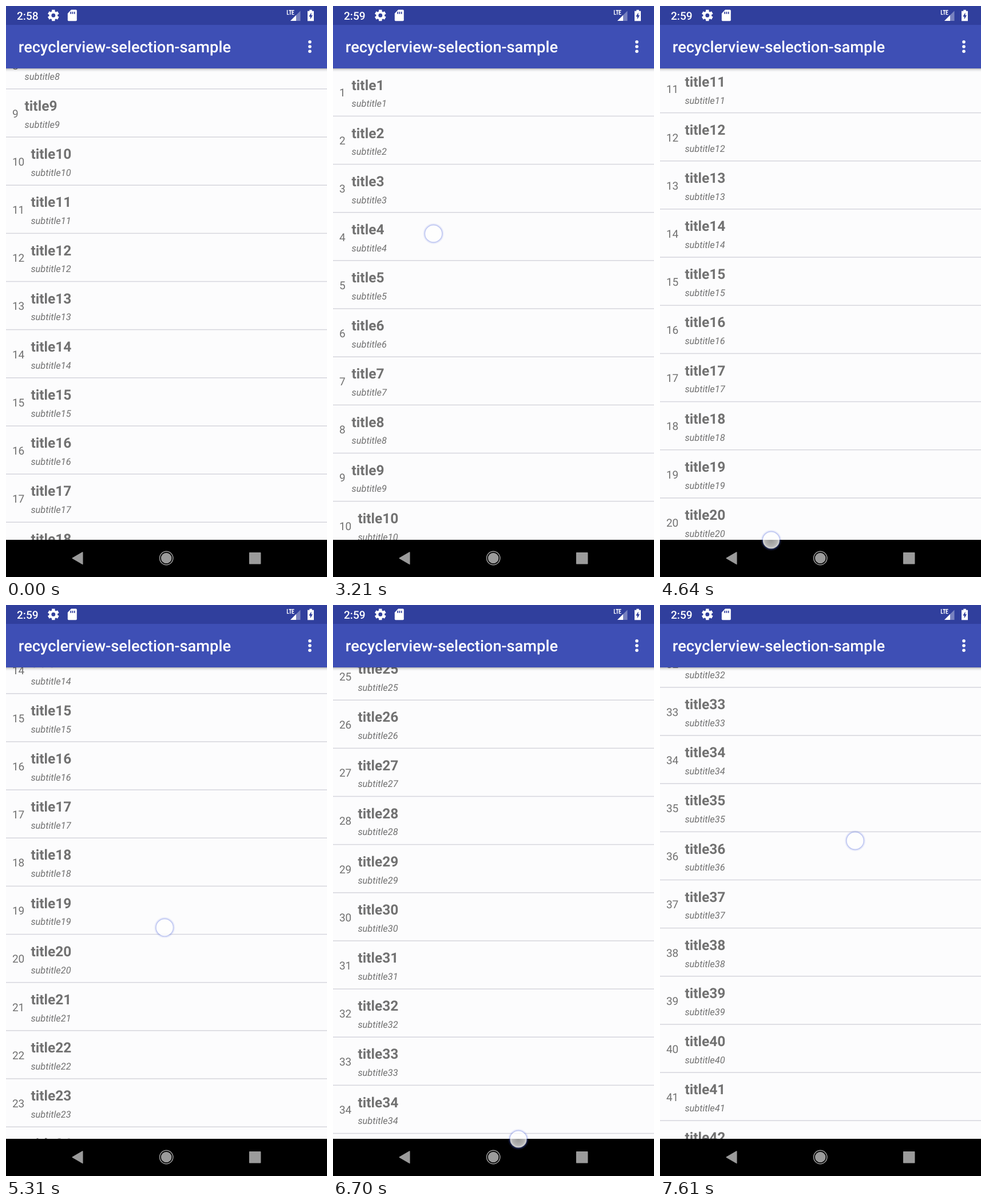
An HTML page for the animation above (8 s loop, 561x998 px).

```html
<!DOCTYPE html>
<html lang="en">
<head>
<meta charset="utf-8">
<title>Drag selection list</title>
<style>
  html, body { margin: 0; width: 100%; height: 100%; overflow: hidden; background: #fcfcfd; }
  svg { display: block; width: 561px; height: 998px; font-family: Roboto, sans-serif; }
  text { text-rendering: geometricPrecision; }
  .num { font-size: 19.09px; }
  .title { font-size: 24.5px; font-weight: 700; }
  .sub { font-size: 16.36px; font-style: italic; }
  #list text { fill: #717171; }
  .bar text { fill: #fff; font-weight: 500; }
</style>
</head>
<body>
<svg viewBox="0 0 561 998">
  <defs>
    <linearGradient id="shade" x2="0" y2="1">
      <stop offset="0" stop-color="#000" stop-opacity=".3"/>
      <stop offset=".4" stop-color="#000" stop-opacity=".1"/>
      <stop offset="1" stop-color="#000" stop-opacity="0"/>
    </linearGradient>
    <radialGradient id="spot">
      <stop offset="0" stop-color="#fff" stop-opacity=".6"/>
      <stop offset=".7" stop-color="#fff" stop-opacity=".7"/>
      <stop offset="1" stop-color="#fff" stop-opacity=".85"/>
    </radialGradient>
  </defs>

  <rect width="561" height="998" fill="#fcfcfd"/>
  <g id="list"></g>

  <rect y="109" width="561" height="6" fill="url(#shade)"/>
  <g class="bar">
    <rect width="561" height="109" fill="#3e4fb5"/>
    <rect width="561" height="33" fill="#303f9d"/>
    <text id="clock" x="19" y="23.8" font-size="19.09"></text>
    <text x="21.8" y="81.2" font-size="27.27">recyclerview-selection-sample</text>
    <g fill="#fff">
      <circle cx="531" cy="62.8" r="2.8"/>
      <circle cx="531" cy="71" r="2.8"/>
      <circle cx="531" cy="79.2" r="2.8"/>
    </g>

    <g transform="translate(82.8 16.4)">
      <g stroke="#fff" stroke-width="5.4">
        <path d="M0-9.8V9.8"/>
        <path d="M0-9.8V9.8" transform="rotate(60)"/>
        <path d="M0-9.8V9.8" transform="rotate(120)"/>
      </g>
      <circle r="7.4" fill="#fff"/>
      <circle r="3.4" fill="#303f9d"/>
    </g>

    <path d="M114 6.6h8.2q1.6 0 1.6 1.6v16.4q0 1.6-1.6 1.6h-12.8q-1.6 0-1.6-1.6v-11.7z" fill="#fff"/>
    <path d="M113.2 10v4M116.4 10v4M119.7 10v4" stroke="#303f9d" stroke-width="1.7"/>

    <path d="M491.6 7v8.2M491 14.6h3.6M494.4 7.7h4.6M496.7 7v8.2M500.2 7v8.2M499.6 7.7h4M499.6 11h3.4M499.6 14.6h4" stroke="#fff" stroke-width="1.4"/>
    <path d="M514.5 8.5V26H497z" fill="#fff" opacity=".35"/>
    <path d="M507 16V26H497z" fill="#fff"/>

    <path d="M530.3 6.8h4.5v2h3.2v17.4h-11V8.8h3.3z" fill="#fff"/>
    <path d="M533.5 11.5l-4.2 7h2.5v4.7l4.2-7h-2.5z" fill="#303f9d"/>
  </g>

  <rect y="933" width="561" height="65" fill="#000"/>
  <g fill="#9b9b9b" stroke="#9b9b9b" stroke-width="1.5" stroke-linejoin="round">
    <path d="M116.2 965.2L133.800 955v20.400z"/>
    <circle cx="280.2" cy="965" r="9.3" stroke="none"/>
    <circle cx="280.2" cy="965" r="11.7" fill="none"/>
    <rect x="425.7" y="955.7" width="19" height="19"/>
  </g>

  <g id="touch">
    <circle r="14.6" fill="url(#spot)"/>
    <g fill="none" stroke="#5068dc">
      <circle r="17" stroke-opacity=".1" stroke-width="2"/>
      <circle r="15.3" stroke-opacity=".34" stroke-width="1.7"/>
    </g>
  </g>
</svg>
<script>
const LOOP = 8000, ROW = 84.15, ROWS = 45, CUT = 50, PRESS = 2540;

// [ms, offset]
const SCROLL = [
  [0, 636.6], [CUT, 636.6], [CUT, 0], [3970, 0], [4080, 12], [4210, 204],
  [4815, 1107], [4890, 1131.6], [6050, 1131.6], [6115, 1136], [6130, 1156.1],
  [6700, 2044.3], [7075, 2628], [7140, 2657.2], [LOOP, 2657.2]
];

// [ms, x, y]
const TOUCH = [
  [PRESS, 175.6, 397], [3190, 175.6, 397], [4080, 194.3, 934], [4760, 194.3, 934],
  [5430, 284.8, 530], [6110, 324, 934], [7040, 324, 934], [7610, 341, 412], [LOOP, 341, 412]
];

const linear = u => u;
const smooth = u => u * u * (3 - 2 * u);

function sample(keys, t, ease) {
  let i = 1;
  while (i < keys.length - 1 && keys[i][0] <= t) i++;
  const a = keys[i - 1], b = keys[i];
  const u = ease(Math.min(1, Math.max(0, (t - a[0]) / (b[0] - a[0]))));
  return a.slice(1).map((v, k) => v + (b[k + 1] - v) * u);
}

const list = document.getElementById("list");
const clock = document.getElementById("clock");
const touch = document.getElementById("touch");

function add(parent, tag, attrs, text = "") {
  const el = document.createElementNS("http://www.w3.org/2000/svg", tag);
  for (const name in attrs) el.setAttribute(name, attrs[name]);
  el.textContent = text;
  return parent.appendChild(el);
}

for (let n = 1; n <= ROWS; n++) {
  const row = add(list, "g", { transform: `translate(0 ${109 + (n - 1) * ROW})` });
  const x = n < 10 ? 32.6 : 43.4;
  add(row, "text", { class: "num", x: 10.9, y: 49.2 }, n);
  add(row, "text", { class: "title", x, y: 37.5 }, "title" + n);
  add(row, "text", { class: "sub", x, y: 67.3 }, "subtitle" + n);
  add(row, "rect", { y: 82.7, width: 561, height: 1.5, fill: "#d6d6dd" });
}

function draw(now) {
  const t = now % LOOP;
  const [offset] = sample(SCROLL, t, linear);
  const [x, y] = sample(TOUCH, t, smooth);
  list.setAttribute("transform", `translate(0 ${-offset})`);
  touch.setAttribute("transform", `translate(${x} ${y})`);
  touch.setAttribute("visibility", t < PRESS ? "hidden" : "visible");
  clock.textContent = t < CUT ? "2:58" : "2:59";
}

const start = performance.now();
function tick() {
  draw(performance.now() - start);
  requestAnimationFrame(tick);
}
tick();
</script>
</body>
</html>
```
